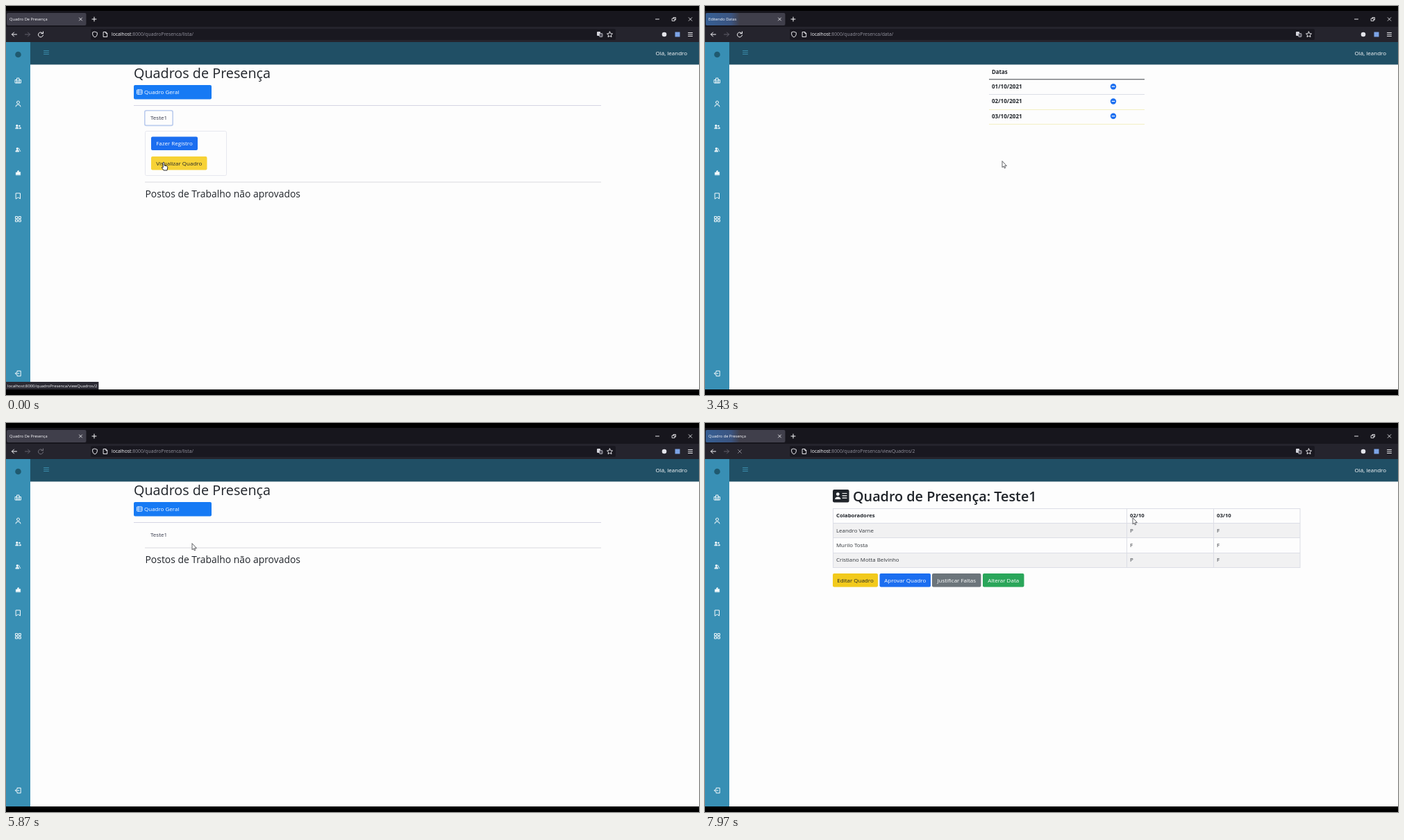
Write an HTML page with a canvas that moves like this. It is 998 by 561 pixels and loops after 8000 ms.

```html
<!DOCTYPE html>
<html lang="pt-BR">
<head>
<meta charset="utf-8">
<title>Quadro de Presença</title>
<style>
html, body { margin: 0; width: 100%; height: 100%; overflow: hidden; background: #000; }
canvas { display: block; }
</style>
</head>
<body>
<canvas id="stage" width="998" height="561"></canvas>
<script>
const ctx = document.getElementById('stage').getContext('2d');
const LOOP = 8000;
const INK = '#20242a', LINE = '#dcdee6', BLUE = '#1b6ef0', YELLOW = '#f2ca1c', CHROME = '#fbfbfe';

const PEOPLE = ['Leandro Varne', 'Murilo Tosta', 'Cristiano Motta Belvinho'];
const MARKS = ['FPF', 'PFF', 'FPF'];
const DAYS = ['01/10', '02/10', '03/10'];
const BASE = '/quadroPresenca/';

// start time, page, tab title, path
const PAGES = [
  [0, 'list', 'Quadro De Presença', 'lista/'],
  [430, 'view', 'Quadro de Presença', 'viewQuadros/2'],
  [3350, 'dates', 'Editendo Datas', 'data/'],
  [5350, 'list', 'Quadro De Presença', 'lista/'],
  [7700, 'view', 'Quadro de Presença', 'viewQuadros/2']
];

// start, end, link shown in the status bar
const LINKS = [
  [0, 430, 'viewQuadros/2'], [430, 1000, 'editar/2'], [2340, 3350, 'data/'],
  [4330, 5200, 'data/remover/1'], [6450, 7120, 'lista/#collapseExample_2'],
  [7170, 7600, 'viewQuadros/2']
];

// time, x, y of the pointer tip
const MOVES = [
  [0, 227, 225], [500, 227, 225], [900, 432, 177], [1240, 432, 177], [1700, 556, 150],
  [2120, 364, 210], [2190, 364, 210], [2480, 428, 224], [3450, 428, 224], [4130, 585, 124],
  [4240, 585, 124], [4400, 587, 114], [5050, 587, 114], [5830, 268, 174], [5900, 268, 174],
  [6480, 226, 161], [7060, 226, 161], [7240, 227, 225], [7420, 227, 225], [7940, 616, 137], [8000, 616, 137]
];

const LOADING = [[30, 430], [2900, 3350], [4700, 5350], [7450, 8000]];
const BURSTS = [430, 3350, 7800];

const VIEW_BUTTONS = [
  [184, 65, 'Editar Quadro', YELLOW, INK], [251.5, 73.5, 'Aprovar Quadro', BLUE, '#fff'],
  [327, 70.5, 'Justificar Faltas', '#6c757b', '#fff'], [400, 59.5, 'Alterar Data', '#2aa65a', '#fff']
];

const within = (t, spans) => spans.some(([a, b]) => t >= a && t < b);
const inBox = (p, x, y, w, h) => p.x >= x && p.x < x + w && p.y >= y && p.y < y + h;

function rect(x, y, w, h, fill) {
  ctx.fillStyle = fill;
  ctx.fillRect(x, y, w, h);
}

function box(x, y, w, h, r, fill, stroke, lw = 1) {
  ctx.beginPath();
  ctx.roundRect(x, y, w, h, r);
  if (fill) { ctx.fillStyle = fill; ctx.fill(); }
  if (stroke) { ctx.strokeStyle = stroke; ctx.lineWidth = lw; ctx.stroke(); }
}

function dot(x, y, r, fill) {
  ctx.beginPath();
  ctx.arc(x, y, r, 0, 7);
  ctx.fillStyle = fill;
  ctx.fill();
}

// y is the middle of the capital letters
function text(s, x, y, size, color = INK, weight = 400, align = 'left') {
  ctx.font = `${weight} ${size}px "Open Sans", "Noto Sans", sans-serif`;
  ctx.textAlign = align;
  ctx.fillStyle = color;
  ctx.fillText(s, x, y + size * 0.357);
  return ctx.measureText(s).width;
}

function icon(x, y, d, color, lw = 1, fill) {
  const path = new Path2D(d);
  ctx.save();
  ctx.translate(x, y);
  ctx.lineCap = ctx.lineJoin = 'round';
  if (fill) { ctx.fillStyle = fill; ctx.fill(path); }
  if (lw) { ctx.strokeStyle = color; ctx.lineWidth = lw; ctx.stroke(path); }
  ctx.restore();
}

function button(x, y, w, h, label, fill, color) {
  box(x, y, w, h, 2, fill);
  text(label, x + w / 2, y + h / 2, 8, color, 400, 'center');
}

function pointerAt(t) {
  const i = MOVES.findIndex(m => m[0] > t);
  const [a, b] = [MOVES[i - 1], MOVES[i]];
  const p = (t - a[0]) / (b[0] - a[0]);
  const e = p * p * (3 - 2 * p);
  return { x: a[1] + (b[1] - a[1]) * e, y: a[2] + (b[2] - a[2]) * e };
}

function openAt(t) {
  if (t < 430) return 1;
  const p = Math.min(1, Math.max(0, (t - 6690) / 350));
  return 1 - (1 - p) ** 2.2;
}

function drawBrowser(t, title, path) {
  rect(0, 0, 998, 561, '#000');
  rect(0, 7, 998, 23, '#17161d');
  rect(0, 30, 998, 22, '#25242d');
  box(122, 33, 756, 16, 2, '#191820');
  box(1, 10, 114.5, 18, 2, '#403f4b');
  if (BURSTS.some(b => t >= b && t < b + 300)) {
    const g = ctx.createLinearGradient(1, 0, 50, 0);
    g.addColorStop(0, '#365f94');
    g.addColorStop(0.75, '#3b5480');
    g.addColorStop(1, '#403f4b');
    box(1, 10, 49, 18, 2, g);
  }
  text(title, 5, 19, 5.7, CHROME);
  icon(107.5, 19, 'M-2-2L2 2M2-2L-2 2', CHROME, 0.8);
  icon(127, 19, 'M-3 0H3M0-3V3', CHROME);
  icon(938, 19, 'M-2.5 0H2.5', CHROME, 0.9);
  icon(962, 19, 'M-2.5-1H1V2.5H-2.5ZM-1-1V-2.5H2.5V1H1', CHROME, 0.8);
  icon(985.5, 19, 'M-2.3-2.3L2.3 2.3M2.3-2.3L-2.3 2.3', CHROME, 0.8);

  icon(12, 41, 'M3.5 0H-3.5L-.5-3M-3.5 0L-.5 3', CHROME);
  icon(31, 41, 'M-3.5 0H3.5L.5-3M3.5 0L.5 3', '#62616c');
  if (within(t, LOADING)) icon(50, 41, 'M-2.5-2.5L2.5 2.5M2.5-2.5L-2.5 2.5', '#85848e');
  else icon(50, 41, 'M3-1.5A3.5 3.5 0 1 0 3.5 1M3.5-4V-1.3H.8', t > 5350 && t < 6000 ? '#74737d' : CHROME);
  icon(128, 41, 'M0-3.8L3.3-2.7V0Q3 3 0 4Q-3 3-3.3 0V-2.7Z', CHROME, 0.9);
  icon(143, 41, 'M-2.5-3.5H.8L2.7-1.5V3.5H-2.5ZM.8-3.5V-1.5H2.7', CHROME, 0.9);
  const w = text('localhost', 152, 41, 6.8, CHROME);
  text(':8000' + BASE + path, 152 + w, 41, 6.8, '#92919c');
  box(851, 37, 5, 6, 1, '#d5d5dc');
  box(854.5, 39.5, 4.5, 5, 1, '#55545f', '#d5d5dc', 0.7);
  icon(869.5, 41, 'M0-4L1.2-1.3 4-1 1.9 .9 2.5 3.7 0 2.3-2.5 3.7-1.9 .9-4-1-1.2-1.3Z', CHROME, 0.9);
  dot(948, 41, 3.3, '#e4e4ea');
  box(963.5, 37.5, 7, 7, 0, '#7da4e6');
  icon(985.5, 41, 'M-3-2.5H3M-3 0H3M-3 2.5H3', CHROME, 0.9);
}

function drawShell() {
  rect(0, 52, 998, 501, '#fdfdfd');
  rect(35, 52, 963, 32.5, '#204f65');
  rect(0, 52, 35, 501, '#388fb4');
  dot(17.5, 70, 4.3, '#205a70');
  icon(58, 67, 'M-3.5-2.5H3.5M-3.5 0H3.5M-3.5 2.5H3.5', '#3d91b2', 0.9);
  text('Olá, leandro', 981, 68, 8, '#fff', 400, 'right');

  const W = '#f4fafc';
  icon(17.5, 107.5, 'M-4-1H-1.5V3.5H-4ZM-1.5-3.5H1.5V3.5H-1.5ZM1.5-1H4V3.5H1.5Z', W);
  icon(17.5, 141, 'M-2-2A2 2 0 1 0 2-2A2 2 0 1 0-2-2M-3.5 4Q-3.5 1.2 0 1.2T3.5 4', W);
  dot(15.8, 172.7, 1.6, W);
  dot(19.4, 172.9, 1.2, W);
  icon(17.5, 174, 'M-4 2.7Q-4 .8-1.7 .8T.6 2.7ZM1.5 2.7Q1.5 1 3 1T4 2.7Z', W, 0.4, W);
  dot(16.3, 205.7, 1.6, W);
  icon(17.5, 207, 'M-3.7 2.7Q-3.5 .8-1.2 .8T1.2 2.7ZM1-2Q2.5-1.2 1.5 .2Q3 .8 3.3 2.6', W, 0.8, W);
  icon(17.5, 240.5, 'M-3.2 3V-.5H-1V-2.5L.8-3.2V-1H3.2V3Z', W, 0.6, W);
  icon(17.5, 274, 'M-3-4H3V4L0 2-3 4Z', W);
  for (const dx of [-4, 0.7]) for (const dy of [-3.7, 0.7]) box(17.5 + dx, 307.3 + dy, 3.2, 3, 0, null, W);
  icon(17.5, 530, 'M-1.5-2V-3.7H3.7V3.7H-1.5V2M1.2 0H-4L-2.2-1.8M-4 0L-2.2 1.8', W);
}

function drawList(t, p) {
  const open = openAt(t);
  const rule = 180 + 74 * open;
  text('Quadros de Presença', 184, 97, 19.8);
  box(184, 114, 112, 20.5, 2, '#167af4');
  box(188.5, 120.7, 7.5, 6.6, 0.8, null, '#fff', 0.8);
  icon(188.5, 120.7, 'M0 2H7.5M0 4.3H7.5M2.3 0V6.6', '#fff', 0.7);
  text('Quadro Geral', 199, 124.3, 8, '#fff');
  rect(184, 143, 673, 1, '#d5d5e3');

  if (open > 0) {
    box(199.8, 150.8, 40.4, 21.6, 2.5, '#fdfdfd', '#bccdee', 1.6);
    ctx.save();
    ctx.beginPath();
    ctx.rect(198, 178, 662, rule - 8 - 178 + (open === 1 ? 1 : 0));
    ctx.clip();
    box(200.5, 180.5, open < 1 ? 656 : 117, 64, 2, null, '#e6e7ee');
    button(209, 188.5, 67, 19.5, 'Fazer Registro', BLUE, '#fff');
    const hot = inBox(p, 209, 217, 80, 20);
    button(209, 217, 80.5, 19.5, 'Visualizar Quadro', hot ? '#f7d236' : YELLOW, INK);
    ctx.restore();
  }
  text('Teste1', 220, 161.5, 8, '#34384a', 400, 'center');
  rect(200, Math.round(rule) - 0.5, 657, 1, '#d9d9e0');
  text('Postos de Trabalho não aprovados', 200.5, rule + 17, 13.9);
  return inBox(p, 200, 151, 40, 21) || (open === 1 && inBox(p, 209, 188, 80, 49));
}

function drawView(t, p) {
  box(184, 96, 23.5, 18.5, 2.2, INK);
  dot(191.3, 102.6, 2.4, '#fff');
  icon(191.3, 110, 'M-4 0Q-4-3.5 0-3.5T4 0Z', '#fff', 0, '#fff');
  icon(198, 101.5, 'M0 0H6M0 3.3H6M0 6.6H6', '#fff', 1.2);
  text('Quadro de Presença: Teste1', 213, 105.5, 19.8, INK, 600);

  const first = t > 5000 ? 1 : 0;
  const cols = first ? [607.5, 732.5] : [540.5, 646.5, 752.5];
  const tops = [123, 144.3, 165.6, 187, 208.3];
  PEOPLE.forEach((_, i) => {
    const y = tops[i + 1], h = tops[i + 2] - y;
    if (inBox(p, 184, y, 673, h)) rect(184, y, 673, h, '#e9e9ea');
    else if (i % 2 === 0) rect(184, y, 673, h, '#f1f1f2');
  });
  for (const y of tops) rect(184, Math.floor(y), 673, 1, LINE);
  for (const x of [184.5, ...cols, 857]) rect(x - 0.5, 123, 1, 86, LINE);
  text('Colaboradores', 189, 133.5, 7.7, INK, 700);
  cols.forEach((x, c) => text(DAYS[c + first], x + 4.5, 133.5, 7.7, INK, 700));
  PEOPLE.forEach((name, i) => {
    const y = 154.7 + i * 21.3;
    text(name, 189, y, 7.9, '#33373c');
    cols.forEach((x, c) => text(MARKS[i][c + first], x + 4.5, y, 7.9, '#33373c'));
  });
  for (const [x, w, label, fill, color] of VIEW_BUTTONS) button(x, 217, w, 19.5, label, fill, color);
  return VIEW_BUTTONS.some(([x, w]) => inBox(p, x, 217, w, 20));
}

function drawDates(t, p) {
  let hot = false;
  text('Datas', 413, 95, 7.9, INK, 700);
  DAYS.forEach((day, i) => {
    const y = 106 + i * 21.3;
    if (inBox(p, 409, y, 224, 21.3)) rect(409, y, 224, 21.3, '#e9e9ea');
    rect(409, Math.round(y + 21.3), 224, 1, i ? '#f3efc4' : LINE);
    text(day + '/2021', 413, y + 10.3, 8.1, INK, 700);
    dot(588, y + 10.2, 4.2, BLUE);
    rect(585.7, y + 9.6, 4.6, 1.2, '#fff');
    hot = hot || inBox(p, 583, y + 5, 10, 10);
  });
  rect(409, 105.3, 224, 1, '#3c4046');
  return hot;
}

function drawStatus(t) {
  const link = LINKS.find(([a, b]) => t >= a && t < b);
  if (!link) return;
  const s = 'localhost:8000' + BASE + link[2];
  ctx.font = '400 5.85px "Open Sans", "Noto Sans", sans-serif';
  rect(0, 542, ctx.measureText(s).width + 4, 11, '#2b2a33');
  text(s, 2, 548, 5.85, CHROME);
}

function drawPointer(p, hand) {
  if (hand) icon(p.x, p.y, 'M-1 1Q0-.6 1 1V5L4.5 5.8Q6 6.2 5.8 7.8L5 12H0L-2.7 8Q-2.8 6.6-1 7.5Z', '#15161a', 0.9, '#fff');
  else icon(p.x, p.y, 'M0 0V8.8L2 7.1 3.3 10 4.7 9.4 3.5 6.6H6Z', '#3c3d42', 0.8, '#fff');
}

const DRAW = { list: drawList, view: drawView, dates: drawDates };

function render(t) {
  const [, page, title, path] = PAGES.filter(p => p[0] <= t).pop();
  const p = pointerAt(t);
  drawBrowser(t, title, path);
  drawShell();
  const hand = DRAW[page](t, p);
  drawStatus(t);
  drawPointer(p, hand);
}

const start = performance.now();
function tick() {
  render((performance.now() - start) % LOOP);
  requestAnimationFrame(tick);
}
tick();
</script>
</body>
</html>
```
